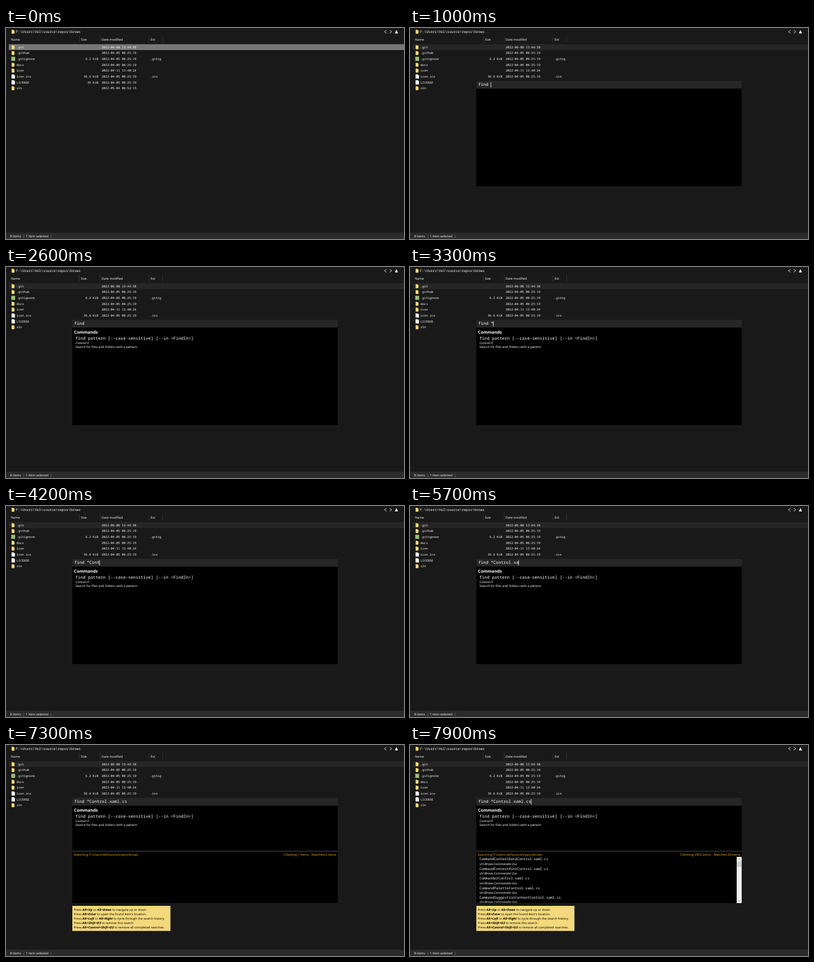
Recreate the animation shown at these times as an HTML page. Size 720 px wide and 383 px high, loop 8000 ms.

```html
<!DOCTYPE html>
<html lang="en">
<head>
<meta charset="utf-8">
<title>File browser search</title>
<style>
  html, body { margin: 0; width: 100%; height: 100%; overflow: hidden; background: #191919; }
  svg { display: block; width: 100vw; height: 100vh; }
  text { fill: #fff; white-space: pre; text-rendering: geometricPrecision; }
  .ui { font: 5.8px "Open Sans", "Noto Sans", sans-serif; }
  .mono { font: 5.52px "Noto Sans Mono", "DejaVu Sans Mono", monospace; }
  .path { font-size: 6.3px; }
  .command { font-size: 7.58px; }
  .title { font-size: 7.7px; font-weight: bold; }
  .italic { font-style: italic; }
  .end { text-anchor: end; }
  .orange { fill: #ffa500; }
  .tip { fill: #000; font-size: 5.7px; }
  .key { font-weight: bold; font-style: italic; }
  .dim { fill: #aaa; }
</style>
</head>
<body>
<svg viewBox="0 0 720 383" preserveAspectRatio="none">
  <defs>
    <clipPath id="listClip"><rect x="120" y="203" width="471" height="83.5"/></clipPath>
    <g id="folder">
      <path d="M0 0h3l.7 1h1.5v6.2H0z" fill="#d9a93c"/>
      <path d="M.9 1.2h4.3v5.2l-1.4.9H.9z" fill="#ffdf80"/>
    </g>
    <path id="file" d="M0 0h4.2l2 2v5.6H0z" fill="#f4f4f4"/>
    <rect id="app" x="-.5" width="7" height="7.4" fill="#9cc07a"/>
  </defs>
  <g id="browser"></g>
  <g id="palette">
    <rect x="120" y="96" width="480" height="191" fill="#000"/>
    <rect x="120" y="96" width="480" height="14" fill="#262626"/>
    <text id="input" class="mono command" x="123.5" y="105.4"></text>
    <rect id="caret" y="98.4" width=".9" height="9.4" fill="#fff"/>
  </g>
  <g id="help"></g>
  <g id="search"></g>
</svg>
<script>
const LOOP = 8000, FRAME = 100, BLINK = 530, CHAR = 4.55;
const ROOT = "F:\\Users\\Vel\\source\\repos\\brows";
const COMMAND = "find *Control.xaml.cs";
// [time, number of typed characters]
const KEYS = [[1000, 5], [3250, 6], [3890, 7], [3990, 8], [4090, 9], [4190, 10], [4290, 11],
  [4390, 12], [4560, 13], [5090, 14], [5690, 16], [5890, 18], [6290, 19], [6690, 21]];
const SEARCH_START = 7300, SEARCH_SPAN = 600, FIRST_MATCH = 0.34;

const $ = id => document.getElementById(id);
const escape = s => s.replace(/&/g, "&amp;").replace(/</g, "&lt;");
const label = (x, y, s, cls = "ui") => `<text x="${x}" y="${y}" class="${cls}">${escape(s)}</text>`;
const box = (x, y, w, h, fill, id = "") =>
  `<rect id="${id}" x="${x}" y="${y}" width="${w}" height="${h}" fill="${fill}"/>`;
const icon = (name, x, y) => `<use href="#${name}" x="${x}" y="${y}"/>`;
const show = (id, visible) => $(id).setAttribute("visibility", visible ? "visible" : "hidden");

const files = [
  ["folder", ".git", "", "2022-06-08 13:44:38", ""],
  ["folder", ".github", "", "2022-04-05 08:25:19", ""],
  ["app", ".gitignore", "6.2 KiB", "2022-04-05 08:25:19", ".gitig"],
  ["folder", "docs", "", "2022-04-05 08:25:19", ""],
  ["folder", "icon", "", "2022-04-11 13:40:24", ""],
  ["file", "icon.ico", "36.6 KiB", "2022-04-05 08:25:19", ".ico"],
  ["file", "LICENSE", "35 KiB", "2022-04-05 08:25:19", ""],
  ["folder", "sln", "", "2022-05-04 08:52:13", ""],
];

function fileRow([kind, name, size, date, ext], i) {
  const y = 36.8 + i * 10.64;
  return icon(kind, 10, y - 5.8) + label(19, y, name, "mono") + label(167, y, size, "mono end") +
    label(173, y, date, "mono") + label(261, y, ext, "mono");
}

$("browser").innerHTML =
  icon("folder", 10, 3) + label(18, 9.2, ROOT, "mono path") +
  `<path d="M688.5 4l-4 2.8 4 2.8M694 4l4 2.8-4 2.8" fill="none" stroke="#fff" stroke-width=".8"/>
   <path d="M706.3 3.8l2.8 6h-5.6z" fill="#fff"/>` +
  [[9, "Name"], [135.5, "Size"], [173, "Date modified"], [261.5, "Ext"]]
    .map(([x, s]) => label(x, 23, s)).join("") +
  [132, 170, 258, 283].map(x => box(x, 14.5, .8, 12, "#383838")).join("") +
  box(5, 29.4, 715, 10.6, "#777", "selection") +
  files.map(fileRow).join("") +
  box(0, 371.5, 720, 11.5, "#2b2b2b") +
  label(7.5, 380, "8 items") + label(30.5, 380, "|", "ui dim") +
  label(36, 380, "1 item selected") + label(80, 380, "|", "ui dim");

$("help").innerHTML =
  label(123, 121, "Commands", "ui title") +
  label(125.5, 132.4, "find pattern [--case-sensitive] [--in <FindIn>]", "mono command") +
  label(125.8, 140, "Control+F", "ui italic") +
  label(125.8, 147, "Search for files and folders with a pattern");

const results = ["CommandContextData", "CommandContextHint", "Commander", "CommandPalette",
  "CommandSuggestionContent"];
const resultRow = (name, i) => `<g id="result${i}">` +
  label(125.5, 209.2 + i * 17.45, name + "Control.xaml.cs", "mono path") +
  label(125.8, 217.6 + i * 17.45, "sln\\Brows.Commander.Gui", "ui italic") + "</g>";

const tips = [
  "Press *Alt+Up* or *Alt+Down* to navigate up or down.",
  "Press *Alt+Enter* to open the found item's location.",
  "Press *Alt+Left* or *Alt+Right* to cycle through the search history.",
  "Press *Alt+Shift+D3* to remove this search.",
  "Press *Alt+Control+Shift+D3* to remove all completed searches.",
];
const tipRow = (s, i) => `<text x="122.6" y="${301 + i * 8.07}" class="ui tip">` +
  s.replace(/\*(.+?)\*/g, '<tspan class="key">$1</tspan>') + "</text>";

$("search").innerHTML =
  box(120, 191.6, 480, 2.4, "#262626") +
  label(122.6, 200.6, "Searching " + ROOT, "ui orange") +
  `<text x="597.6" y="200.6" class="ui orange end"><tspan id="checked"></tspan><tspan id="matched" dx="5"></tspan></text>` +
  `<g clip-path="url(#listClip)">${results.map(resultRow).join("")}</g>` +
  `<g id="scrollbar">${box(591, 203, 9, 84, "#f0f0f0")}${box(591.4, 211.3, 8.2, 10, "#cdcdcd")}
   <path d="M593.7 208.3l1.8-1.8 1.8 1.8M593.7 282l1.8 1.8 1.8-1.8" fill="none" stroke="#606060" stroke-width=".8"/></g>` +
  box(120, 292, 177.5, 45.5, "#f3d97c") + tips.map(tipRow).join("");

function drawSearch(t) {
  const progress = (t - SEARCH_START) / SEARCH_SPAN;
  const matched = Math.max(0, Math.round(26 * (progress - FIRST_MATCH) / (1 - FIRST_MATCH)));
  const visible = t >= SEARCH_START;
  show("search", visible);
  $("checked").textContent = `Checking ${Math.round(7 + 2895 * progress)} items`;
  $("matched").textContent = `Matched ${matched} items`;
  results.forEach((_, i) => show("result" + i, visible && i < matched));
  show("scrollbar", visible && matched > 4);
}

function draw(now) {
  const t = Math.floor(now % LOOP / FRAME) * FRAME;
  const [keyTime, typed] = KEYS.filter(([time]) => time <= t).pop() || KEYS[0];
  const open = t >= 1000;
  $("selection").setAttribute("fill", open ? "#262626" : "#777");
  show("palette", open);
  show("help", t >= 1100);
  $("input").textContent = COMMAND.slice(0, typed);
  $("caret").setAttribute("x", 123.1 + typed * CHAR);
  show("caret", open && Math.floor((t - keyTime) / BLINK) % 2 === 0);
  drawSearch(t);
}

const start = performance.now();
function tick() {
  draw(performance.now() - start);
  requestAnimationFrame(tick);
}
tick();
</script>
</body>
</html>
```
